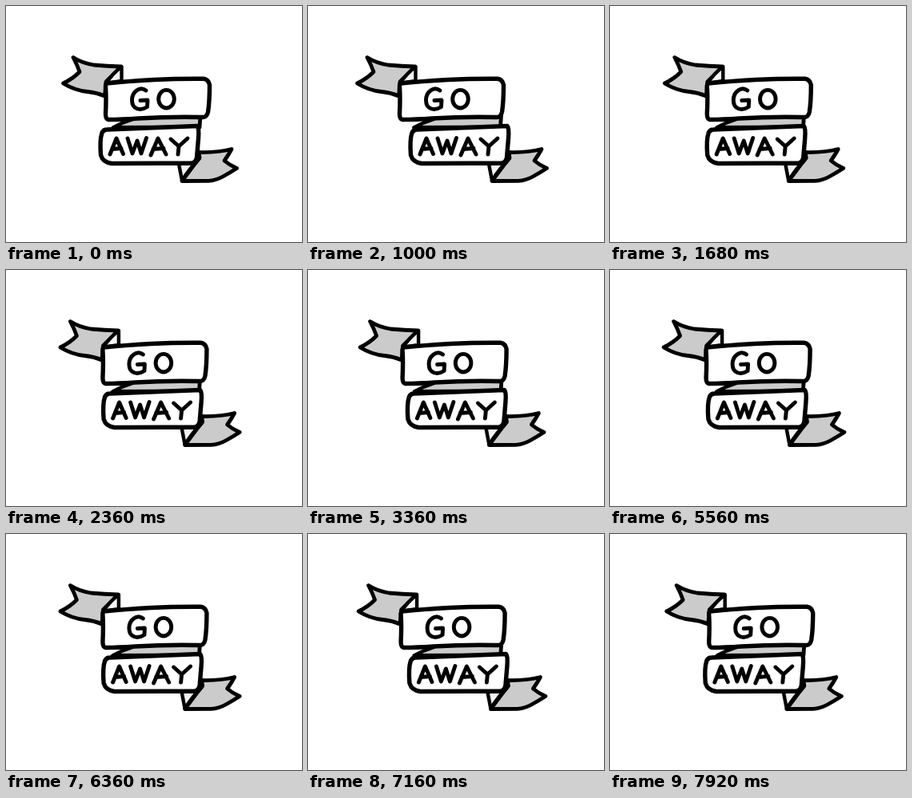
These frames come from a looping animation (370x296 px, 7.96 s). An HTML page:

```html
<!DOCTYPE html>
<html lang="en">
<head>
<meta charset="utf-8">
<title>Go away</title>
<style>
  html, body { margin: 0; width: 100%; height: 100%; overflow: hidden; background: #fff; }
  svg { display: block; width: 100%; height: 100%; }
  path, ellipse { stroke: #000; stroke-linecap: round; stroke-linejoin: round; }
  .cloth { fill: #cbcbcb; stroke-width: 4.8; }
  .crease { fill: #f4f4f4; stroke-width: 4.4; }
  .panel { fill: #fff; stroke-width: 5.4; }
  .letters > * { fill: none; stroke-width: 4.9; }
</style>
</head>
<body>
<svg viewBox="0 0 370 296" role="img" aria-label="GO AWAY">
  <path id="fold" class="cloth" d="M134 152.5 Q145 146 158 142 L165 137 L243 137 L242 152Z"/>

  <g id="lower">
    <path class="cloth" d="M241 183.500 Q265 184 282 179.500 Q278 187 273 194 Q280 200 288.500 203.500 Q280 209 271 214 Q262 219 253 219.300 L220 219.500 L242 190Z"/>
    <path class="crease" d="M216 198 L220 219 Q229 204 242 191 L237 197Z"/>
    <path class="panel" d="M126 155 Q180 153 239 150.500 Q241.500 153 240.500 166 L238.500 190 Q237 197 231 197.300 Q180 197 132 197.500 Q121 196 118.500 187 Q117 168 120 159 Q122 155 126 155Z"/>
    <g class="letters">
      <path d="M130 186 L138 166 L146.500 185.500 M133 179.500 L144 178.500"/>
      <path d="M152 166 L158 185 L164 169 L169 185 L175.500 165.500"/>
      <path d="M181 187 L190 166 L200 186 M184 179.500 L197 178.500"/>
      <path d="M206 167 L216 176 L227 166 M216 176 L215 186"/>
    </g>
  </g>

  <g id="upper">
    <path class="cloth" d="M84 64.500 Q95 71.500 110 74 Q127 75.500 144 76 L125 95 L123.500 113 Q113 108.500 102 107.500 Q86 106 71.500 97 Q84 91 92 82.500 Q89 74 84 64.500Z"/>
    <path class="crease" d="M144.500 76 L144.500 94 L125 97 Q133 85 144.500 76Z"/>
    <path class="panel" d="M126 97 Q150 94.500 185 92.500 Q215 91 247 91.300 Q253 92 254.500 99 Q254.500 120 252.500 133 Q251 139.500 246 139.500 Q205 138.500 165 141 Q145 142.500 128 142.500 Q124.500 142 124.500 135 Q125.500 116 124.500 101 Q124.500 97.500 126 97Z"/>
    <g class="letters">
      <path d="M175 106 C167 100 157.500 108 157.500 118 C157.500 130 168 132 176.500 126.500 L177 118 L168 118.500"/>
      <ellipse cx="200.500" cy="116.700" rx="9.800" ry="11.300"/>
    </g>
  </g>
</svg>
<script>
const LOOP = 7960, STEP = 40, SWAY = 2000, REACH = 10;
const upper = document.getElementById("upper");
const lower = document.getElementById("lower");
const fold = document.getElementById("fold");

const slide = (node, x) => node.setAttribute("transform", `translate(${x.toFixed(2)} 0)`);

function draw(elapsed) {
  const time = Math.floor((elapsed % LOOP) / STEP) * STEP;
  const phase = (time % SWAY) / SWAY;
  const shift = REACH * (1 - Math.abs(1 - 2 * phase));
  slide(upper, -shift);
  slide(lower, shift);
  slide(fold, -shift * 0.15);
}

const start = performance.now();
function tick() {
  draw(performance.now() - start);
  requestAnimationFrame(tick);
}
tick();
</script>
</body>
</html>
```
